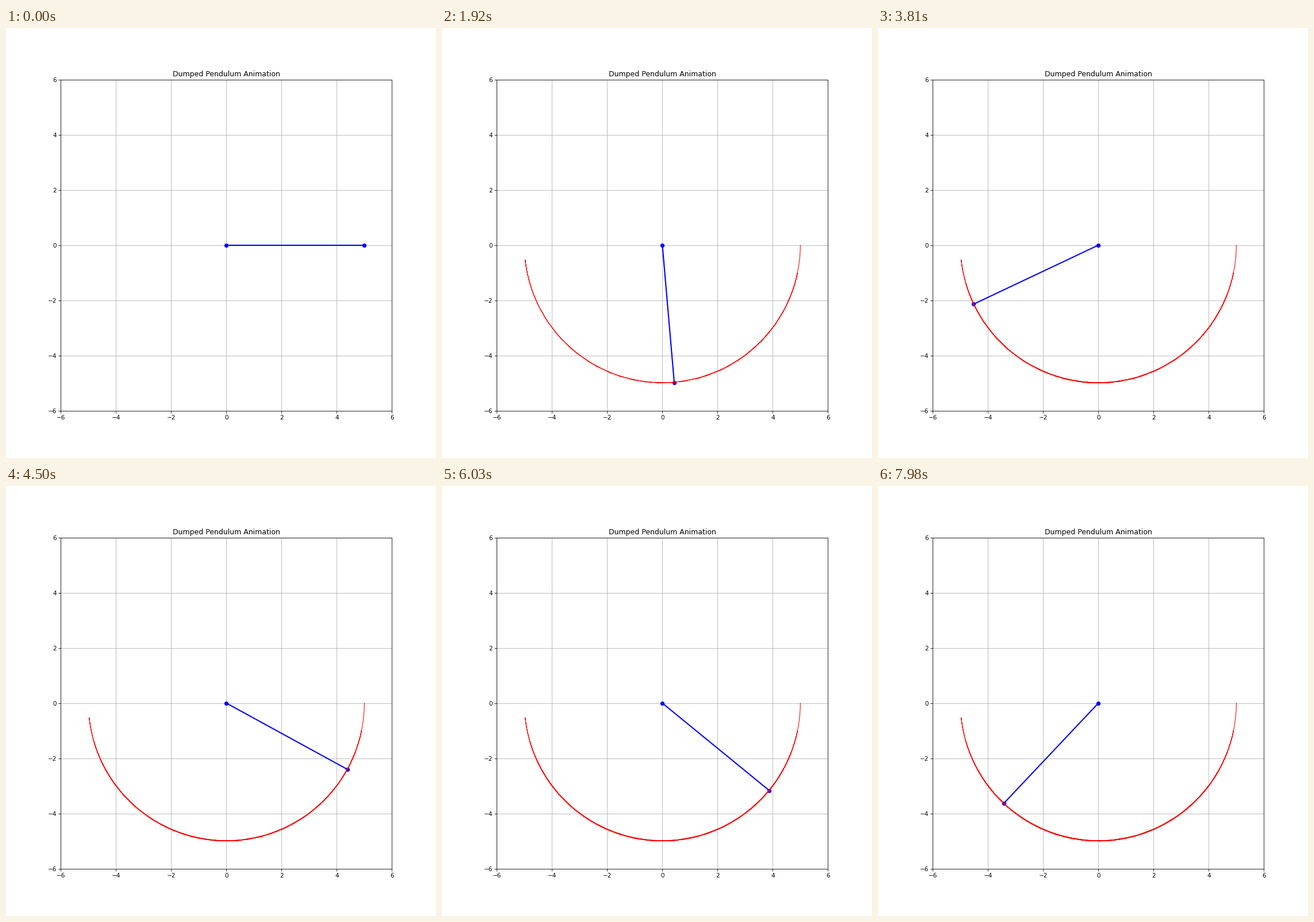
A matplotlib script that plays this animation: 748 px wide and 748 px high, repeating every 8000 ms.

```python
import numpy as np
import matplotlib.pyplot as plt
from matplotlib.animation import FuncAnimation

LOOP_MS = 8000
TICK_MS = 20           # drawing interval
STEP_MS = 30           # time each pendulum pose is held
STEPS = 267

G, LENGTH, DAMPING = 9.81, 5.0, 0.046
DT = 40 / 399          # simulated seconds per pose
SUBSTEPS = 10


def slope(state):
    theta, omega = state
    return np.array([omega, -G / LENGTH * np.sin(theta) - DAMPING * omega])


def rk4(state, h):
    k1 = slope(state)
    k2 = slope(state + h / 2 * k1)
    k3 = slope(state + h / 2 * k2)
    k4 = slope(state + h * k3)
    return state + h / 6 * (k1 + 2 * k2 + 2 * k3 + k4)


def swing():
    state = np.array([np.pi / 2, 0.0])
    angles = [state[0]]
    for _ in range(STEPS - 1):
        for _ in range(SUBSTEPS):
            state = rk4(state, DT / SUBSTEPS)
        angles.append(state[0])
    return np.array(angles)


theta = swing()
xs = LENGTH * np.sin(theta)
ys = -LENGTH * np.cos(theta)

fig, ax = plt.subplots(figsize=(10, 10), dpi=74.8)
ax.set_xlim(-6, 6)
ax.set_ylim(-6, 6)
ax.set_aspect("equal")
ax.grid()
ax.set_title("Dumped Pendulum Animation")

rod, = ax.plot([], [], "o-", color="blue", lw=2)
trail, = ax.plot([], [], "-", color="red", lw=1)


def draw(tick):
    step = min((tick * TICK_MS + TICK_MS // 2) // STEP_MS, STEPS - 1)
    rod.set_data([0, xs[step]], [0, ys[step]])
    # the trail stays one pose behind the bob
    trail.set_data(xs[:step], ys[:step])
    return rod, trail


def reset():
    return draw(0)


anim = FuncAnimation(fig, draw, frames=LOOP_MS // TICK_MS, init_func=reset,
                     interval=TICK_MS, repeat=True, repeat_delay=0)
plt.show()
```
